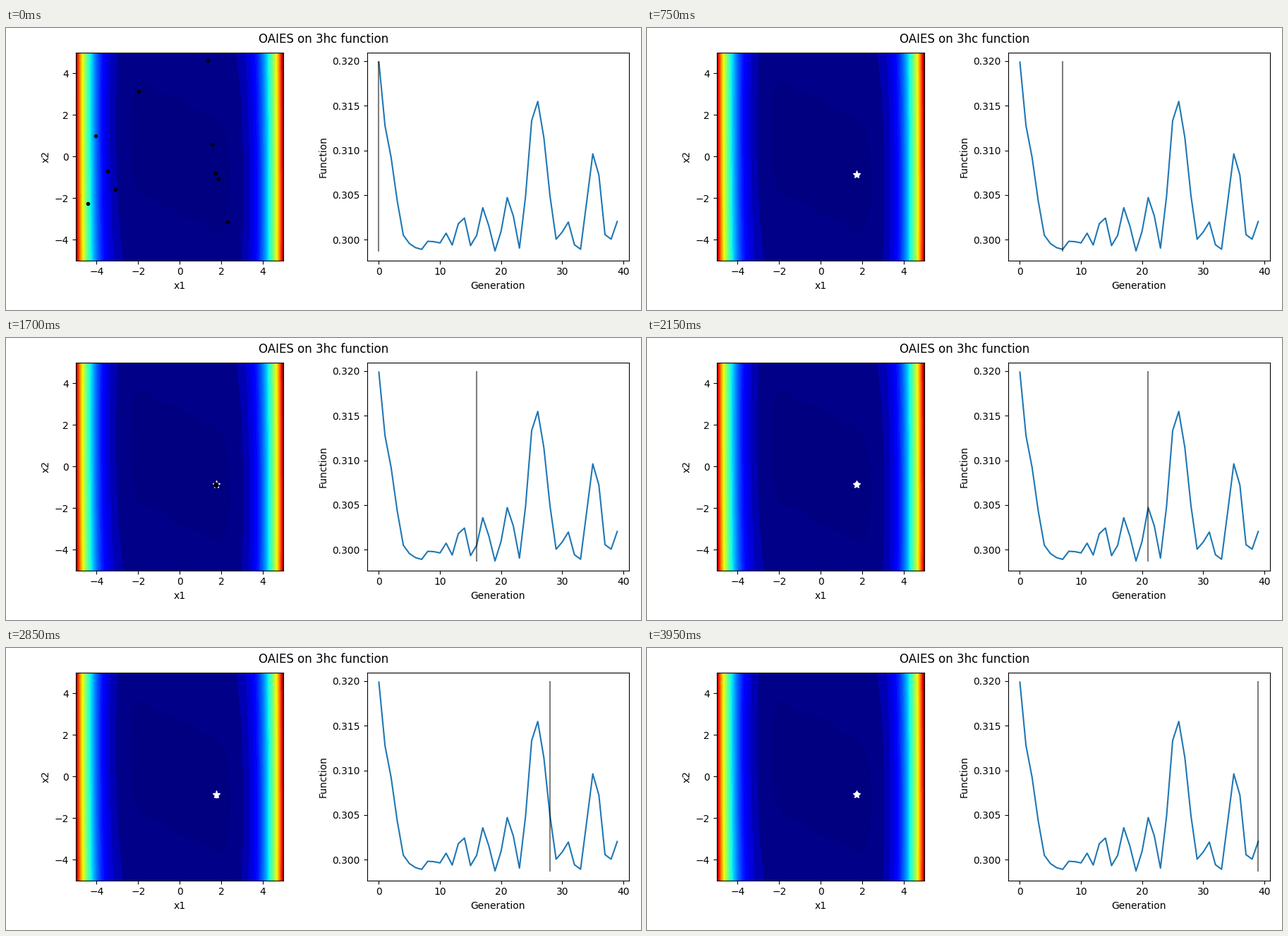
A matplotlib script for the animation above (4 s loop, 900 by 400 pixels).

```python
import numpy as np
import matplotlib.pyplot as plt
from matplotlib.animation import FuncAnimation

W, H = 900, 400
GENS, INTERVAL = 40, 50
OPT = np.array([1.7475, -0.8738])  # local minimum the search settles in
FLOOR = 0.29874

# First random candidates
start = np.array([
    (1.34, 4.64), (-1.99, 3.12), (-4.06, .98), (-3.48, -.69), (-3.11, -1.57),
    (-4.43, -2.28), (1.57, .60), (1.71, -.79), (1.85, -1.09), (2.29, -3.13)])

# Setbacks of the search: generation and height
peaks = [(2.2, 34), (8.5, 13), (10.9, 20), (13.62, 41), (17.13, 49), (21.18, 61),
         (25.73, 171), (27.85, 42), (30.75, 34), (35.22, 111), (39, 33)]


def bump(g, center, height):
    """Raised cosine; taller bumps are wider."""
    u = np.clip((g - center) / (1.5 + height / 120), -1, 1)
    return height * np.cos(np.pi * u / 2)**2


def camel(x, y):
    return 2 * x**2 - 1.05 * x**4 + x**6 / 6 + x * y + y**2


def population(gen):
    """Candidates of a generation, closing in on the minimum."""
    if gen == 0:
        return start
    noise = np.random.default_rng(gen).normal(size=start.shape) * (.006, .02)
    return OPT + (start - OPT) * .3**gen + noise


def winner(gen):
    """Current pick, displaced along the flat direction of the valley."""
    side = 1 if gen % 2 else -1
    return OPT + side * np.sqrt(history[gen] - FLOOR) * np.array([-.08, 1])


def best(gen):
    return OPT + (.02 * np.cos(np.pi * (gen - 12) / 8), -.01)


def pixel_axes(x, y, w, h):
    return fig.add_axes([x / W, y / H, w / W, h / H])


gens = np.arange(GENS)
decay = 211.5 * np.exp(-.47 * gens**1.2)
history = FLOOR + 1e-4 * (decay + sum(bump(gens, *p) for p in peaks))

fig = plt.figure(figsize=(W / 100, H / 100), dpi=100)
fig.suptitle("OAIES on 3hc function", y=.9825)

# Landscape
land = pixel_axes(98.85, 70.4, 294.6, 294.6)
grid = np.linspace(-5, 5, 50)
X, Y = np.meshgrid(grid, grid)
Z = camel(X, Y)
levels = np.r_[0, 8, 65, 130, 200:2080:20]
shades = plt.get_cmap("jet")(np.sqrt(levels[:-1] * levels[1:]) / Z.max())
land.contourf(X, Y, Z, levels=levels, colors=shades)
land.set(xlim=(-5, 5), ylim=(-5, 5), xlabel="x1", ylabel="x2",
         xticks=range(-4, 5, 2), yticks=range(-4, 5, 2))
star, = land.plot([], [], "w*", ms=8, zorder=3)
dots, = land.plot([], [], "k.", ms=6, zorder=4)

# Convergence history
conv = pixel_axes(511.6, 70.4, 371.6, 294.6)
conv.plot(gens, history)
low, high = history.min(), history.max()
pad = .05 * (high - low)
conv.set(xlim=(-1.95, 40.95), ylim=(low - pad, high + pad),
         xlabel="Generation", ylabel="Function")
cursor, = conv.plot([0, 0], [low, high], "k", alpha=.5)


def update(n):
    """Even steps test new candidates, odd steps keep the winner."""
    shown = max(0, (n - 1) // 2)
    cursor.set_xdata([shown, shown])
    if n % 2:
        points, color = winner(shown)[None], "w"
    else:
        points, color = population(n // 2), "k"
    dots.set_data(points[:, 0], points[:, 1])
    dots.set_color(color)
    x, y = best(shown)
    star.set_data([x], [y])
    star.set_visible(n > 0)
    return cursor, dots, star


anim = FuncAnimation(fig, update, frames=2 * GENS, interval=INTERVAL,
                     repeat=True, repeat_delay=0)
plt.show()
```
